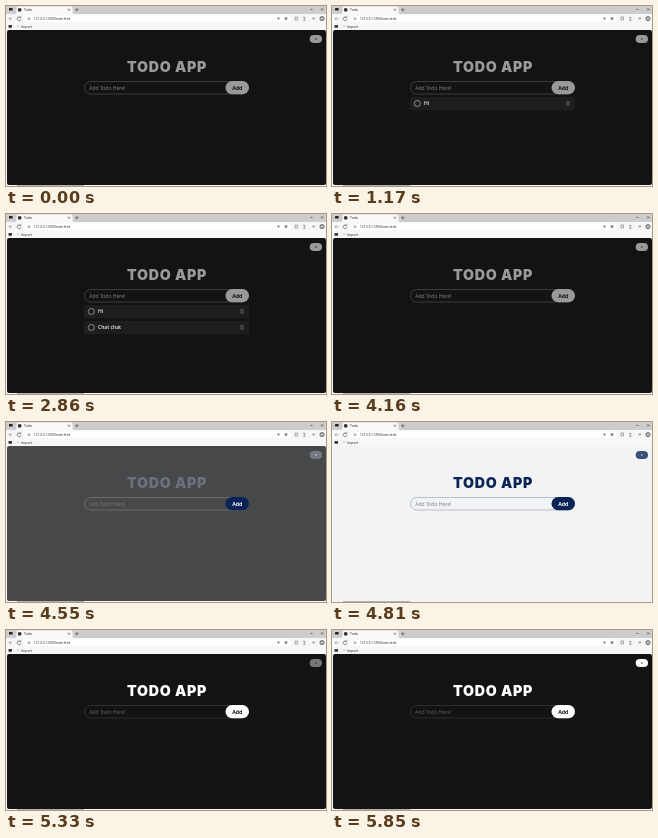
Animation, 320 px wide and 180 px high, one loop 5.98 s. Source, as an HTML page:

```html
<!DOCTYPE html>
<html lang="en">
<head>
<meta charset="utf-8">
<title>Todo</title>
<style>
html, body { margin: 0; width: 100%; height: 100%; overflow: hidden; background: #fff; }
svg { display: block; width: 320px; height: 180px; }
text { font-family: "Open Sans", "Noto Sans", sans-serif; font-size: 5px; }
.chrome text { font-size: 3.5px; fill: #222; }
.chrome #url { font-size: 3.1px; }
.line { fill: none; stroke: #444; stroke-width: .6; }
#title { font: 900 14.2px Inter, sans-serif; letter-spacing: .75px; }
#addText { font-weight: 700; font-size: 5.2px; }
</style>
</head>
<body>
<svg viewBox="0 0 320 180">
  <g class="chrome">
    <rect width="320" height="180" fill="#f7f7f7"/>
    <rect width="320" height="8" fill="#cdcdcd"/>
    <path d="M9 8q1.5 0 1.5-1.5V2q0-1.5 1.5-1.5h53q1.5 0 1.5 1.5v4.5q0 1.5 1.5 1.5z" fill="#f9f9f9"/>
    <rect x="3" y="2" width="3.6" height="2.4" rx=".5" fill="#222"/>
    <circle cx="13.7" cy="3.8" r="1.9" fill="#333"/>
    <text x="18" y="5">Todo</text>
    <path class="line" d="M62 2.7l2 2m0-2l-2 2M69 3.8h3.6M70.8 2v3.6"/>
    <path class="line" d="M304 3.5h2.5M315 2.3l2.3 2.3m0-2.300l-2.300 2.300"/>
    <rect x="19" y="9.5" width="265" height="6.5" rx="3.2" fill="#fff"/>
    <path class="line" d="M6.5 12.700H3m1.500-1.500L3 12.700l1.500 1.500" opacity=".6"/>
    <path class="line" d="M14.600 11.600a1.900 1.900 0 1 0 .3 1.800m-.2-2.900v1.300h-1.300"/>
    <circle class="line" cx="23" cy="12.700" r="1.1" opacity=".7"/>
    <text id="url" x="28" y="13.800">127.0.0.1:5500/todo.html</text>
    <g class="line" opacity=".75">
      <path d="M271 12.500h3m-1.500-1.500v3M278.500 12h3l-2.300 2 .8-3 .9 3z"/>
      <path d="M289 11h2.500v3H289zM297 11.300h2.600m-1.300 0v3m-1.300 0h2.600M306.500 12h2.400l-1.200 1.500z"/>
    </g>
    <circle cx="316" cy="12.600" r="2.100" fill="#bbb" stroke="#444" stroke-width=".7"/>
    <rect x="2.500" y="19" width="3.500" height="2.800" rx=".5" fill="#333"/>
    <rect x="11" y="19" width="2.200" height="2.600" fill="#ddd"/>
    <text x="15" y="21.700">Import</text>
    <path d="M11 179.600h67" stroke="#777" stroke-width=".6"/>
  </g>
  <rect id="page" x="1" y="24" width="319" height="155" rx="2"/>
  <rect id="toggle" x="303.700" y="28.900" width="12.300" height="8.200" rx="4.100"/>
  <circle id="dot" cx="309.900" cy="33" r=".8" opacity=".8"/>
  <text id="title" x="161" y="66" text-anchor="middle">TODO APP</text>
  <rect id="field" x="78.500" y="75.500" width="164" height="12.500" rx="6.250" fill="none" stroke-width=".5"/>
  <text id="entry" x="83.300" y="83.800"></text>
  <rect id="add" x="219.500" y="75" width="23.500" height="13.300" rx="6.650"/>
  <text id="addText" x="231.300" y="83.700" text-anchor="middle">Add</text>
  <g id="list"></g>
</svg>
<script>
const LOOP = 5980, STEP = 130;
const $ = id => document.getElementById(id);

// time, page, title, button, button text, border, placeholder, toggle
const THEMES = [
  [0, '#111314', '#999', '#999', '#111314', '#656565', '#858585', '#999'],
  [4550, '#464849', '#6c707d', '#0a2457', '#fff', '#888a8c', '#777a7d', '#747986'],
  [4680, '#a1a3a5', '#3b4a70', '#0a2457', '#fff', '#858a92', '#777a7d', '#465478'],
  [4810, '#f2f3f4', '#0a2457', '#0a2457', '#fff', '#858a92', '#777a7d', '#3b5079'],
  [5070, '#858789', '#9299a8', '#cdd0d5', '#222', '#777', '#666', '#777b82'],
  [5200, '#222425', '#f0f1f3', '#fff', '#111314', '#555657', '#686868', '#717273'],
  [5330, '#111314', '#fff', '#fff', '#111314', '#4b4b4b', '#656565', '#777'],
  [5720, '#111314', '#fff', '#fff', '#111314', '#4b4b4b', '#656565', '#c0c0c0'],
  [5850, '#111314', '#fff', '#fff', '#111314', '#4b4b4b', '#656565', '#fff']
];

// start of typing, ms per letter, then added, checked, deleted
const TODOS = [
  { text: 'Hi', type: 390, pace: 130, add: 910, check: 3250, remove: 3900 },
  { text: 'Chat chat', type: 1430, pace: 104, add: 2600, check: 3510, remove: 4160 }
];

const rows = TODOS.map(todo => {
  const row = document.createElementNS('http://www.w3.org/2000/svg', 'g');
  row.innerHTML = `
    <rect x="78" y="91" width="165" height="13.3" rx="2" fill="#1c1e1f"/>
    <circle cx="85.3" cy="97.5" r="3" fill="none" stroke="#b8b8b8" stroke-width=".7"/>
    <path d="M83.8 97.5l1.1 1.1 2-2.2" fill="none" stroke="#111314" stroke-width=".8"/>
    <text x="92" y="99.3" fill="#f4f4f4" font-weight="600">${todo.text}</text>
    <path d="M234 95.5h4m-2.6-.7h1.2M234.5 96.2l.2 3.2h2.6l.2-3.2z" fill="#3c3e3f" stroke="#555758" stroke-width=".5"/>`;
  $('list').append(row);
  return row;
});

function paint(id, attr, color) {
  $(id).setAttribute(attr, color);
}

function drawTheme(t) {
  const [, page, title, button, label, border, hint, toggle] =
    THEMES.filter(theme => theme[0] <= t).pop();
  paint('page', 'fill', page);
  paint('title', 'fill', title);
  paint('add', 'fill', button);
  paint('addText', 'fill', label);
  paint('field', 'stroke', border);
  paint('toggle', 'fill', toggle);
  paint('dot', 'fill', label);
  return hint;
}

function drawEntry(t, hint) {
  const todo = TODOS.find(item => t >= item.type && t < item.add);
  const count = todo ? Math.floor((t - todo.type) / todo.pace) + 1 : 0;
  $('entry').textContent = todo ? todo.text.slice(0, count) : 'Add Todo Here!';
  paint('entry', 'fill', todo ? '#c8c8c8' : hint);
}

function drawList(t) {
  let slot = 0;
  TODOS.forEach((todo, i) => {
    const shown = t >= todo.add && t < todo.remove;
    const done = t >= todo.check;
    const [, ring, tick, label] = rows[i].children;
    rows[i].style.display = shown ? '' : 'none';
    if (!shown) return;
    rows[i].setAttribute('transform', `translate(0 ${16 * slot++})`);
    ring.setAttribute('fill', done ? '#999' : 'none');
    tick.style.display = done ? '' : 'none';
    label.style.textDecoration = done ? 'line-through' : 'none';
    label.style.opacity = done ? .6 : 1;
  });
}

function draw(now) {
  const t = Math.floor((now % LOOP) / STEP) * STEP;
  drawEntry(t, drawTheme(t));
  drawList(t);
}

function frame() {
  draw(performance.now() - start);
  requestAnimationFrame(frame);
}

const start = performance.now();
frame();
</script>
</body>
</html>
```
